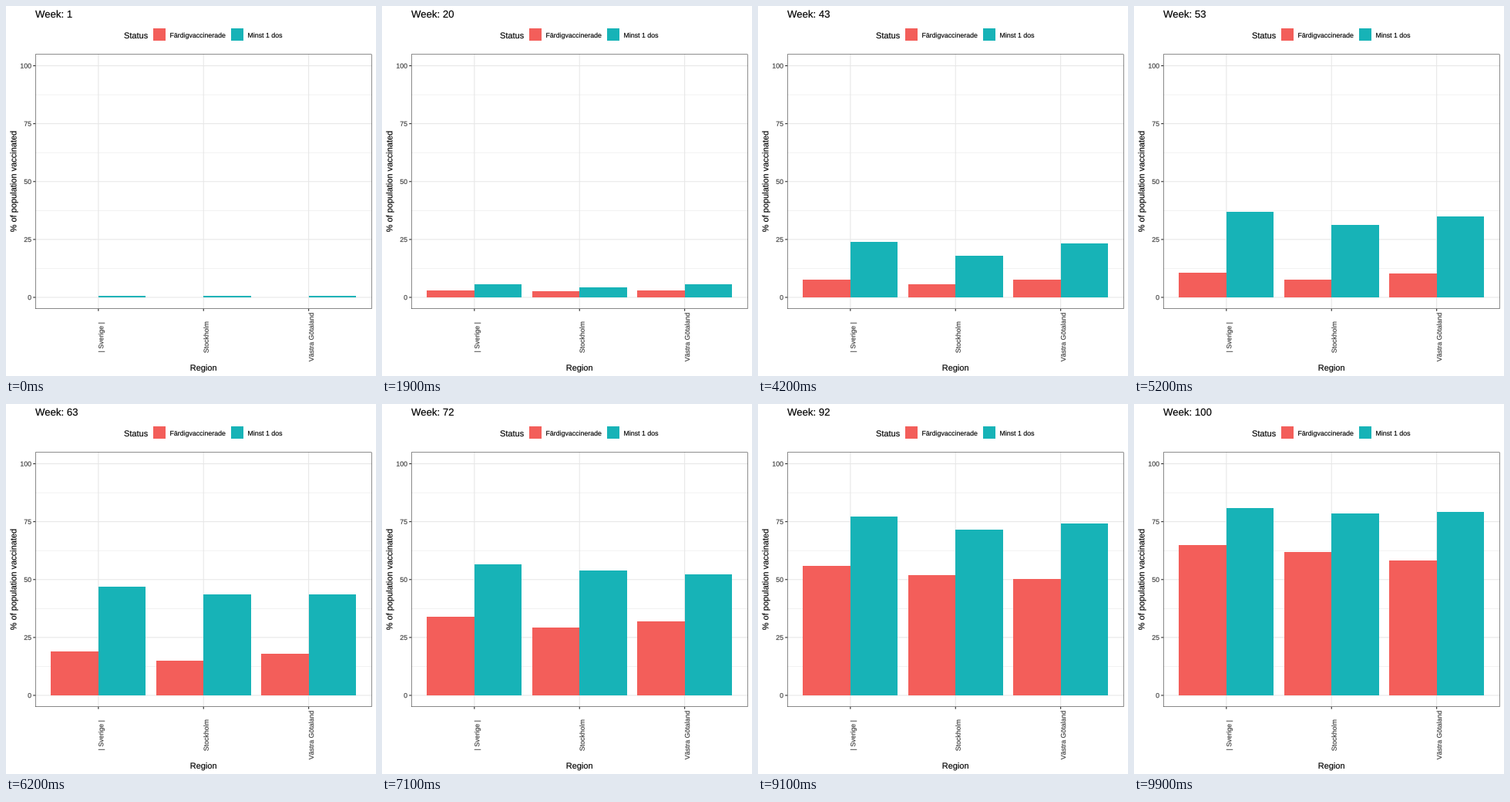
A matplotlib script that plays this animation: 480 by 480 pixels, repeating every 10000 ms.

```python
import numpy as np
import matplotlib.pyplot as plt
from matplotlib.animation import FuncAnimation
from matplotlib.patches import PathPatch, Rectangle
from matplotlib.textpath import TextPath
from matplotlib.transforms import Affine2D

plt.rcParams["font.family"] = "Liberation Sans"

SIZE, DPI = 480, 72
WEEKS, STEP_MS = 100, 100
LEFT, RIGHT, TOP, BOTTOM = 38.0, 474.5, 62.5, 393.0
RED, TEAL = "#F35E5A", "#17B3B7"
GRID, DARK, LABEL = "#E7E7E7", "#262626", "#3C3C3C"

REGIONS = ["| Sverige |", "Stockholm", "Västra Götaland"]
UNIT = (RIGHT - LEFT) / 3.2
BAR = 0.45 * UNIT


def curve(*points):
    """Monotone cubic through a few (week, share) points."""
    xs, ys = np.array(points, float).T
    h = np.diff(xs)
    d = np.diff(ys) / h
    m = np.concatenate([d[:1], 2 * d[:-1] * d[1:] / (d[:-1] + d[1:]), d[-1:]])

    def value(x):
        i = min(np.searchsorted(xs, x, side="right") - 1, len(h) - 1)
        t = (x - xs[i]) / h[i]
        return ((1 + 2 * t) * (1 - t) ** 2 * ys[i] + t * (1 - t) ** 2 * h[i] * m[i]
                + t ** 2 * (3 - 2 * t) * ys[i + 1] + t ** 2 * (t - 1) * h[i] * m[i + 1])

    return value


def bump(x, height, middle, width):
    return height * np.exp(-((x - middle) / width) ** 2 / 2)


# National progress; the regions trail behind it by smooth gaps
full_national = curve((0, 0), (19, 3), (32, 5.6), (52, 10.7),
                      (66, 24), (71, 34), (82, 45.9), (99, 64.9))
first_national = curve((0, 0.6), (19, 5.6), (32, 13), (52, 36.9),
                       (71, 56.6), (82, 71.9), (99, 80.9))


def full_shares(w):
    n = full_national(w)
    return n, n - bump(w, 4.8, 75, 25), n - bump(w, 7, 105, 22)


def first_shares(w):
    n = first_national(w)
    return (n, n - bump(w, 6.2, 45, 15) - bump(w, 6, 87, 9),
            n - bump(w, 4.4, 75, 18))


def y_px(value):
    return BOTTOM - (value + 5) / 110 * (BOTTOM - TOP)


def center(k):
    return LEFT + (0.6 + k) * UNIT


fig = plt.figure(figsize=(SIZE / DPI, SIZE / DPI), dpi=DPI, facecolor="white")
ax = fig.add_axes([0, 0, 1, 1])
ax.set_xlim(0, SIZE)
ax.set_ylim(SIZE, 0)
ax.axis("off")


def line(x0, y0, x1, y1, color, width=1.07):
    ax.plot([x0, x1], [y0, y1], color=color, lw=width, zorder=1,
            solid_capstyle="butt", snap=False)


def box(x, y, w, h, color):
    return ax.add_patch(Rectangle((x, y), w, h, fc=color, lw=0, zorder=2, snap=True))


def text_path(x, y, text, size, ha="left", angle=0):
    path = TextPath((0, 0), text, size=size)
    ink = path.get_extents()
    dx = {"left": 0, "center": (ink.x0 + ink.x1) / 2, "right": ink.x1}[ha]
    place = Affine2D().translate(-dx, 0).scale(1, -1).rotate_deg(-angle).translate(x, y)
    return path.transformed(place)


def label(x, y, text, size, color="black", **kw):
    return ax.add_patch(PathPatch(text_path(x, y, text, size, **kw), fc=color,
                                  ec=color, lw=0.15, zorder=3, snap=False))


# Grid, ticks and axis labels
for v in np.arange(12.5, 100, 25):
    line(LEFT, y_px(v), RIGHT, y_px(v), GRID, 0.53)
for v in range(0, 101, 25):
    y = y_px(v)
    line(LEFT, y, RIGHT, y, GRID)
    line(LEFT - 2.75, y, LEFT, y, DARK)
    label(32.7, y + 3.15, str(v), 8.8, LABEL, ha="right")
for k, name in enumerate(REGIONS):
    x = center(k)
    line(x, TOP, x, BOTTOM, GRID)
    line(x, BOTTOM, x, BOTTOM + 2.75, DARK)
    label(x + 6.4, 429.8, name, 8.8, LABEL, ha="center", angle=90)

ax.add_patch(Rectangle((LEFT + .27, TOP + .27), RIGHT - LEFT - .54, BOTTOM - TOP - .54,
                       fill=False, ec=DARK, lw=0.54, zorder=4, snap=False))

# Titles and legend
label((LEFT + RIGHT) / 2, 473, "Region", 11, ha="center")
label(13.4, (TOP + BOTTOM) / 2, "% of population vaccinated", 11, ha="center", angle=90)
label(153, 42, "Status", 11)
for x, color, name in [(191, RED, "Färdigvaccinerade"), (292, TEAL, "Minst 1 dos")]:
    box(x, 29, 16, 16, color)
    label(x + 21.5, 41, name, 8.8)
title = label(LEFT, 15, "Week: 1", 13.2)

full_bars = [box(center(k) - BAR, y_px(0), BAR, 0, RED) for k in range(3)]
first_bars = [box(center(k), y_px(0), BAR, 0, TEAL) for k in range(3)]


def update(i):
    title.set_path(text_path(LEFT, 15, f"Week: {i + 1}", 13.2))
    for bars, shares in [(full_bars, full_shares(i)), (first_bars, first_shares(i))]:
        for bar, share in zip(bars, shares):
            share = max(share, 0)
            bar.set_y(y_px(share))
            bar.set_height(y_px(0) - y_px(share))
            bar.set_visible(share > 0)
    return [title, *full_bars, *first_bars]


anim = FuncAnimation(fig, update, frames=WEEKS, interval=STEP_MS,
                     repeat=True, repeat_delay=0, blit=False)
plt.show()
```
